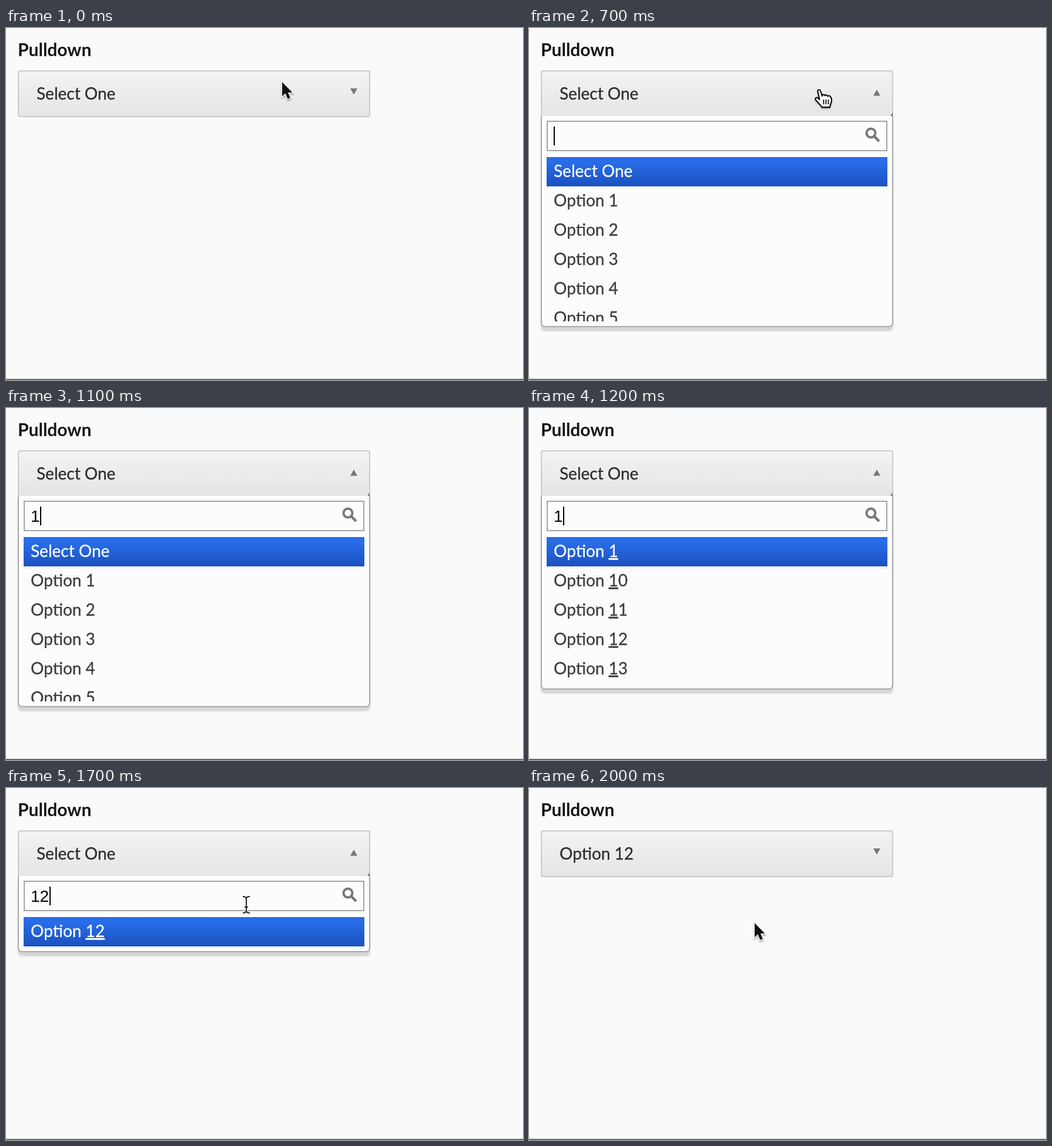
Animation, 880 px wide and 600 px high, one loop 2100 ms. Source, as an HTML page:

```html
<!DOCTYPE html>
<html lang="en">
<head>
<meta charset="utf-8">
<title>Searchable pulldown</title>
<style>
  html, body { margin: 0; width: 100%; height: 100%; overflow: hidden; background: #fafafa; }
  svg { display: block; width: 880px; height: 600px; }
  text { font: 28px Lato, sans-serif; fill: #2c2c2c; stroke: #2c2c2c; stroke-width: .3px; white-space: pre; }
  #title { font-size: 30px; font-weight: 700; fill: #161616; stroke: none; }
  #query { font-family: "Liberation Sans", Arial, sans-serif; fill: #000; stroke: none; }
  #rows text { fill: #3c3c3c; stroke: #3c3c3c; }
  #rows text.on { fill: #fff; stroke: #fff; }
  .hit { text-decoration: underline; text-decoration-thickness: 2px; text-underline-offset: 2px; }
  #panel { filter: drop-shadow(0 7px 1.5px rgba(0, 0, 0, .14)); }
  .pointer { filter: drop-shadow(0 2px 1px rgba(0, 0, 0, .35)); }
</style>
</head>
<body>
<svg viewBox="0 0 880 600">
  <defs>
    <linearGradient id="face" x2="0" y2="1">
      <stop stop-color="#f3f3f3"/><stop offset="1" stop-color="#e5e5e5"/>
    </linearGradient>
    <linearGradient id="blue" x2="0" y2="1">
      <stop offset=".2" stop-color="#286ce7"/><stop offset=".9" stop-color="#1c54c4"/>
    </linearGradient>
    <clipPath id="view"><rect x="22" y="220" width="596" height="280"/></clipPath>
  </defs>

  <rect y="598" width="880" height="2" fill="#6b6b6b"/>
  <text id="title" x="20" y="48">Pulldown</text>

  <rect id="closed" x="21" y="73" width="598" height="78" rx="3" fill="url(#face)" stroke="#cbcbcb" stroke-width="2"/>

  <g id="open">
    <path id="panel" fill="#fcfcfc" stroke="#a9a9a9" stroke-width="2"/>
    <path d="M21 150V76Q21 73 24 73H616Q619 73 619 76V150" fill="url(#face)" stroke="#cbcbcb" stroke-width="2"/>
    <path d="M22 151H618" stroke="#fff" stroke-width="2"/>
    <path d="M619 144V150H615Z" fill="#777"/>
    <rect x="31" y="159" width="578" height="50" fill="#fcfcfc" stroke="#a5a5a5" stroke-width="2"/>
    <g fill="none" stroke="#777" stroke-width="4">
      <circle cx="582" cy="179" r="7.5"/>
      <path d="M587.5 184.5L596 193" stroke-width="4.5"/>
    </g>
    <text id="query" x="42" y="194"></text>
    <rect id="caret" y="168" width="2" height="32"/>
    <rect x="30" y="220" width="580" height="50" fill="url(#blue)"/>
    <g id="rows" clip-path="url(#view)"></g>
  </g>

  <text id="label" x="52" y="122"></text>
  <path id="mark" fill="#777"/>

  <g id="arrow" class="pointer">
    <path d="M0 0V24.5L5.5 19.5L9.5 29L14 27L10 18H17.5Z" fill="#111" stroke="#fff" stroke-width="3" paint-order="stroke"/>
  </g>
  <g id="hand" class="pointer">
    <path d="M5.5 4C5 1 9 0 10 3L13 12C13 9 17 8.5 18 11.5C18.5 9.5 22 9.5 22.5 12.5C23.5 11 27 11 28 14.5C29.5 18 29.5 21 27.5 25L26 31H12.5C11 27 5 23 2 18.5C.5 16 3 13.5 5.5 15L8.5 18Z"
      fill="#fff" stroke="#000" stroke-width="2" stroke-linejoin="round"/>
    <path d="M15.5 18V26M19.5 18V26M23.5 18V26" stroke="#000" stroke-width="1.7"/>
  </g>
  <g id="beam">
    <path id="beamShape" d="M-6 -14Q0 -14 0 -10Q0 -14 6 -14M0 -10V10M-6 14Q0 14 0 10Q0 14 6 14M-3 4H3" fill="none" stroke="#fff" stroke-width="4"/>
    <use href="#beamShape" style="display:none"/>
    <path d="M-6 -14Q0 -14 0 -10Q0 -14 6 -14M0 -10V10M-6 14Q0 14 0 10Q0 14 6 14M-3 4H3" fill="none" stroke="#222" stroke-width="2"/>
  </g>
</svg>
<script>
const LOOP = 2100;
const $ = id => document.getElementById(id);
const options = ["Select One", ...Array.from({ length: 13 }, (_, i) => `Option ${i + 1}`)];

// Each step keeps the values of the one before unless it sets them.
const steps = [
  { at: 0, pointer: "arrow", x: 470, y: 92, open: false, label: "Select One", query: "", filter: "", caret: true },
  { at: 200, pointer: "hand", x: 477, y: 98 },
  { at: 300, x: 486, y: 104 },
  { at: 700, open: true },
  { at: 900, pointer: "beam", x: 446, y: 184 },
  { at: 1000, x: 409, y: 199 },
  { at: 1100, pointer: "", query: "1" },
  { at: 1200, filter: "1" },
  { at: 1400, query: "12", filter: "12" },
  { at: 1500, caret: false },
  { at: 1700, caret: true, pointer: "beam" },
  { at: 1800, pointer: "hand", x: 384, y: 221 },
  { at: 1900, x: 374, y: 230 },
  { at: 2000, pointer: "arrow", x: 384, y: 230, open: false, label: "Option 12" }
];
for (let i = 1; i < steps.length; i++) steps[i] = { ...steps[i - 1], ...steps[i] };

const show = (id, on) => { $(id).style.display = on ? "" : "none"; };

function drawRows(filter) {
  const found = options.filter(name => name.includes(filter));
  $("rows").innerHTML = found.slice(0, 6).map((name, i) => {
    const text = filter ? name.replace(filter, `<tspan class="hit">${filter}</tspan>`) : name;
    return `<text x="42" y="${254 + i * 50}" class="${i ? "" : "on"}">${text}</text>`;
  }).join("");
  const bottom = 229 + Math.min(found.length * 50, 280);
  $("panel").setAttribute("d", `M21 150V${bottom - 7}Q21 ${bottom} 28 ${bottom}H612Q619 ${bottom} 619 ${bottom - 7}V150`);
}

function draw(s) {
  show("closed", !s.open);
  show("open", s.open);
  $("label").textContent = s.label;
  $("mark").setAttribute("d", s.open ? "M586 115.5L592 105L598 115.5Z" : "M586 103L592 113.5L598 103Z");
  $("query").textContent = s.query;
  $("caret").setAttribute("x", 42 + s.query.length * 16);
  show("caret", s.caret);
  drawRows(s.filter);
  for (const id of ["arrow", "hand", "beam"]) {
    show(id, id === s.pointer);
    $(id).setAttribute("transform", `translate(${s.x} ${s.y})`);
  }
}

let current;
const start = performance.now();
function tick(now) {
  const t = Math.max(0, now - start) % LOOP;
  const step = steps.findLast(s => s.at <= t);
  if (step !== current) draw(current = step);
  requestAnimationFrame(tick);
}
tick(start);
</script>
</body>
</html>
```
